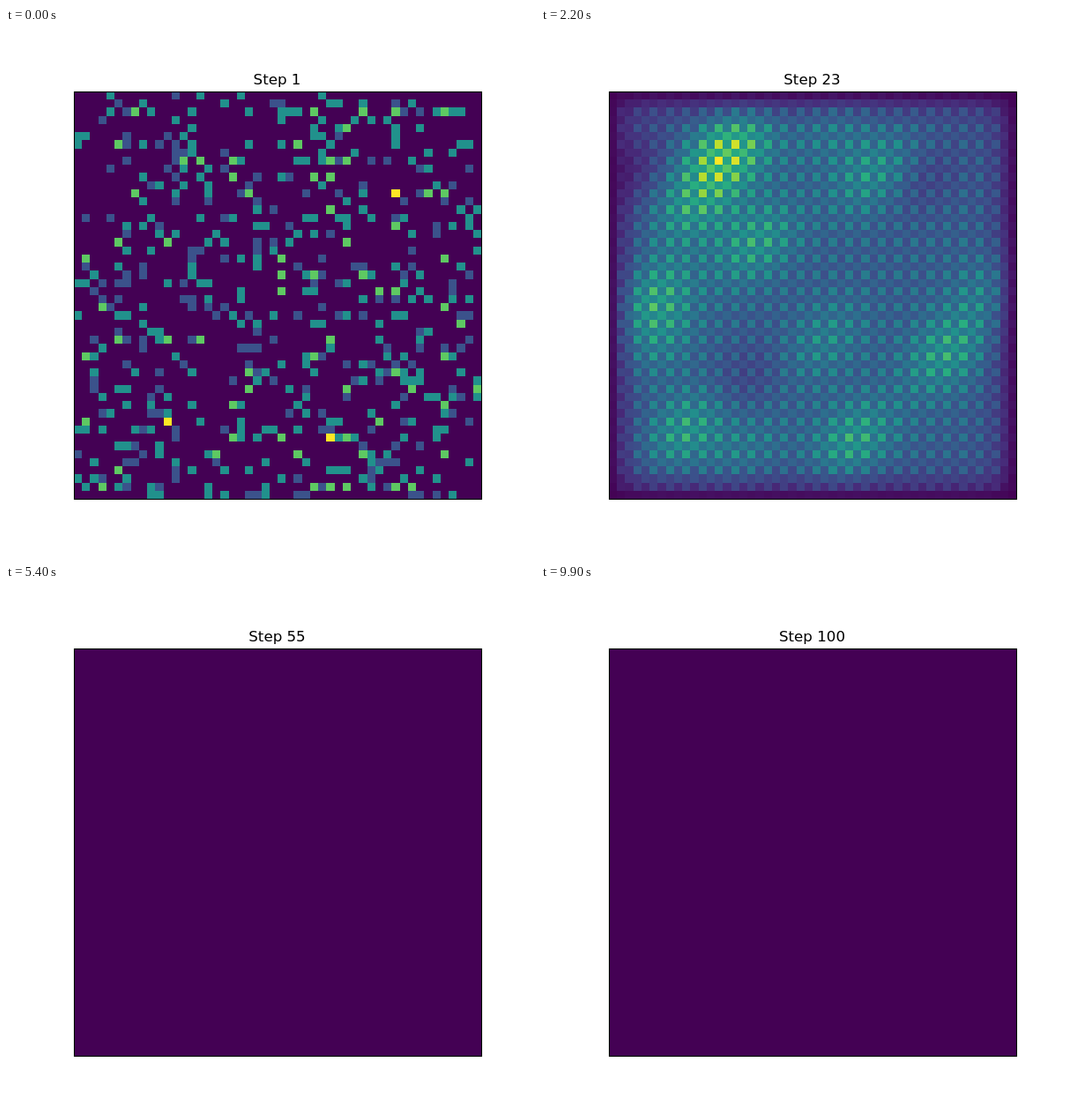
Recreate the animation shown at these times as an HTML page with a canvas. Size 600 by 600 pixels, loop 10 s.

```html
<!DOCTYPE html>
<html lang="en">
<head>
<meta charset="utf-8">
<title>Diffusion steps</title>
<style>
  html, body { margin: 0; width: 100%; height: 100%; overflow: hidden; background: #fff; }
  canvas, svg { position: absolute; left: 0; top: 0; width: 600px; height: 600px; }
  text { font: 16.667px "DejaVu Sans", sans-serif; text-anchor: middle; }
</style>
</head>
<body>
<canvas id="grid" width="600" height="600"></canvas>
<svg viewBox="0 0 600 600">
  <rect x="77.5" y="72.5" width="462" height="462" fill="none" stroke="#000" stroke-width="1.1"/>
  <text id="title" x="307.5" y="64">Step 1</text>
</svg>
<script>
const SIZE = 50, CELL = 9.24, LEFT = 77, TOP = 72;
const STEP_MS = 100, STEPS = 100, LAST_LIVE_STEP = 50;
const BACKGROUND = .31;
const ctx = document.getElementById('grid').getContext('2d');
const title = document.getElementById('title');

const palette = ['440154', '472d7b', '3b528b', '2c728e', '21918c', '28ae80', '5ec962', 'addc30', 'fde725']
  .map(hex => [0, 2, 4].map(i => parseInt(hex.slice(i, i + 2), 16)));

// Main concentrations: column, row, strength
const blobs = [
  [14, 7, .62], [10, 13.5, .3], [17.5, 18, .32], [4.5, 25, .36], [5.5, 30, .18],
  [32, 9.5, .26], [27, 3.5, .14], [47, 23.5, .22], [41, 31.5, .32], [26, 30, .18],
  [9, 41, .33], [16, 44, .16], [29.5, 42.5, .34],
  [2, 9, -.24], [16, 35, -.13], [38.5, 10, -.14]
];

function randomFrom(seed) {
  return () => {
    seed = (seed + 0x6D2B79F5) | 0;
    let t = Math.imul(seed ^ seed >>> 15, 1 | seed);
    t = t + Math.imul(t ^ t >>> 7, 61 | t) ^ t;
    return ((t ^ t >>> 14) >>> 0) / 4294967296;
  };
}

const makeField = fn => Array.from({ length: SIZE * SIZE }, (_, i) => fn(i % SIZE, Math.floor(i / SIZE)));
const at = (field, c, r) => c < 0 || r < 0 || c >= SIZE || r >= SIZE ? 0 : field[r * SIZE + c];
const clamp = v => Math.max(0, Math.min(1, v));

function normalise(field) {
  const max = Math.max(...field);
  return field.map(v => v / max);
}

// Uneven weights of the alternating lattice sites, more marked as time goes on
function siteWeight(c, r, step) {
  const oddColumn = c % 2, oddRow = r % 2;
  const settled = oddRow ? (oddColumn ? .62 : .76) : (oddColumn ? 1 : .58);
  return settled ** Math.min(1, .6 + step / 60);
}

// Diffusion runs faster along the rising diagonal than across it
function concentration(c, r, step) {
  const spread = n => [1.5 + .65 * n, 1 + .3 * n];
  const [along, across] = spread(step);
  const [along15, across15] = spread(15);
  const fade = Math.sqrt(along15 * across15 / (along * across));
  return blobs.reduce((sum, [x, y, strength]) => {
    const a = (c - x - r + y) ** 2 / 2, b = (c - x + r - y) ** 2 / 2;
    return sum + strength * fade * Math.exp(-a / (2 * along) - b / (2 * across));
  }, BACKGROUND);
}

function smoothField(step) {
  const reach = .6 * Math.sqrt(step);
  const edge = p => Math.tanh((Math.min(p, SIZE - 1 - p) + .35) / reach);
  return normalise(makeField((c, r) =>
    Math.max(0, concentration(c, r, step)) * edge(c) * edge(r) * siteWeight(c, r, step)));
}

function scatteredField() {
  const random = randomFrom(41);
  return makeField((c, r) => {
    const live = random() < .1 + .3 * clamp(concentration(c, r, 8));
    const kind = random();
    if (!live) return 0;
    if (c % 2 && r % 2 === 0) return kind < .03 ? 1 : kind < .6 ? .75 : .5;
    return kind < .48 ? .25 : .5;
  });
}

const diffuse = field => makeField((c, r) => at(field, c, r)
  + at(field, c - 1, r) + at(field, c + 1, r) + at(field, c, r - 1) + at(field, c, r + 1)
  + at(field, c + 1, r - 1) + at(field, c - 1, r + 1));

const states = [];
for (let step = 1, scatter = scatteredField(); step <= LAST_LIVE_STEP; step++) {
  if (step === 1) {
    states[step] = scatter;
    continue;
  }
  scatter = normalise(diffuse(scatter));
  const u = clamp((step - 1) / 13);
  const blend = u * u * (3 - 2 * u);
  const smooth = smoothField(step);
  const rough = normalise(makeField((c, r) => at(scatter, c, r) * siteWeight(c, r, step)));
  states[step] = normalise(smooth.map((v, i) => blend * v + (1 - blend) * rough[i]));
}

function colour(value) {
  const p = clamp(value) * (palette.length - 1);
  const i = Math.min(palette.length - 2, Math.floor(p));
  const mixed = palette[i].map((a, k) => Math.round(a + (palette[i + 1][k] - a) * (p - i)));
  return `rgb(${mixed})`;
}

function draw(step) {
  title.textContent = `Step ${step}`;
  ctx.fillStyle = colour(0);
  ctx.fillRect(LEFT, TOP, 462, 462);
  const state = states[step];
  if (!state) return;
  const edge = k => Math.round(k * CELL);
  state.forEach((value, i) => {
    const c = i % SIZE, r = Math.floor(i / SIZE);
    ctx.fillStyle = colour(value);
    ctx.fillRect(LEFT + edge(c), TOP + edge(r), edge(c + 1) - edge(c), edge(r + 1) - edge(r));
  });
}

let shown = 0;
const start = performance.now();
function tick() {
  const elapsed = Math.max(0, performance.now() - start);
  const step = Math.floor(elapsed / STEP_MS) % STEPS + 1;
  if (step !== shown) draw(shown = step);
  requestAnimationFrame(tick);
}
tick();
</script>
</body>
</html>
```
